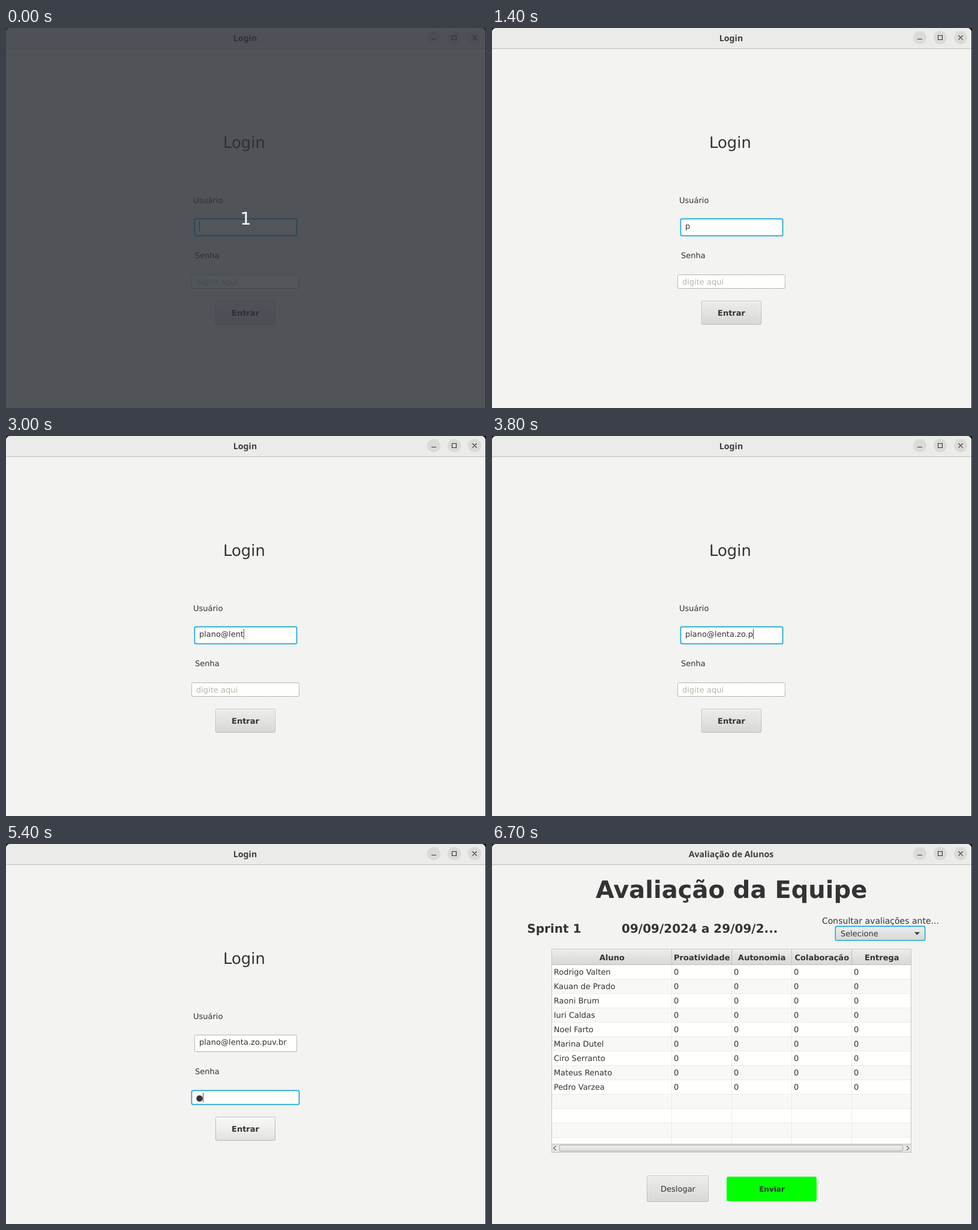
These frames come from a looping animation (800 by 634 pixels, 8000 ms). An HTML page:

```html
<!DOCTYPE html>
<html lang="pt-BR">
<head>
<meta charset="utf-8">
<title>Login</title>
<style>
html, body { margin: 0; width: 100%; height: 100%; overflow: hidden; background: #151515; }
svg { display: block; width: 800px; height: 634px; }
text { font-family: "DejaVu Sans", sans-serif; font-size: 13px; fill: #333; text-rendering: geometricPrecision; white-space: pre; }
.bold { font-weight: bold; }
.mid { text-anchor: middle; }
.title { font: bold 14.2px "Noto Sans", "Open Sans", sans-serif; fill: #3d3d3d; }
</style>
</head>
<body>
<svg id="stage" viewBox="0 0 800 634" xmlns="http://www.w3.org/2000/svg"></svg>
<script>
const LOOP = 8000;
const EMAIL = "plano@lenta.zo.puv.br";
const NAMES = ["Rodrigo Valten", "Kauan de Prado", "Raoni Brum", "Iuri Caldas", "Noel Farto",
  "Marina Dutel", "Ciro Serranto", "Mateus Renato", "Pedro Varzea"];
const BLUE = "#039ed3";

// [time, characters typed]
const TYPING = [[0, 0], [900, 1], [1600, 2], [1800, 3], [1900, 4], [2000, 5], [2300, 6], [2600, 7],
  [2800, 8], [2900, 9], [3000, 10], [3200, 11], [3300, 12], [3400, 13], [3500, 14], [3700, 15],
  [3800, 16], [4000, 17], [4100, 18], [4300, 19], [4400, 21]];
// [time, caret visible]
const BLINK = [[0, 1], [300, 0], [600, 1], [1400, 0], [1600, 1], [5500, 0]];
const T = { reveal: 100, password: 4700, dot: 5000, hover: 5200, press: 5900, title: 6300, team: 6400, combo: 6700 };

const stage = document.getElementById("stage");

function el(parent, tag, attrs = {}, content) {
  const node = document.createElementNS("http://www.w3.org/2000/svg", tag);
  for (const key in attrs) node.setAttribute(key, attrs[key]);
  if (content !== undefined) node.textContent = content;
  return parent.appendChild(node);
}
const group = parent => el(parent, "g");
const rect = (p, x, y, width, height, fill, rx = 0) => el(p, "rect", { x, y, width, height, fill, rx });
const path = (p, d, stroke, width = 1) => el(p, "path", { d, stroke, "stroke-width": width, fill: "none" });
const label = (p, x, y, str, cls = "", size = 13) =>
  el(p, "text", { x, y, class: cls, style: cls === "title mid" ? "" : `font-size:${size}px` }, str);
const show = (node, on) => node.setAttribute("visibility", on ? "inherit" : "hidden");
const at = (steps, t) => steps.filter(s => s[0] <= t).pop()[1];

const defs = el(stage, "defs");
function gradient(id, ...colors) {
  const g = el(defs, "linearGradient", { id, x1: 0, y1: 0, x2: 0, y2: 1 });
  colors.forEach((c, i) => el(g, "stop", { offset: i / (colors.length - 1), "stop-color": c }));
  return `url(#${id})`;
}
const FACE = gradient("face", "#ececeb", "#d8d8d7");
const HOVER = gradient("hover", "#f8f8f6", "#e3e3e1");
const DOWN = gradient("down", "#dbdbda", "#cacac9");
const RIM = gradient("rim", "#fafaf9", "#e2e2e1");
const BORDER = gradient("border", "#c2c2c1", "#b2b2b1");
const TRACK = gradient("track", "#d9d9d8", "#ececeb", "#e2e2e1");

function focusRing(p, x, y, w, h) {
  const g = group(p);
  rect(g, x - 1.4, y - 1.4, w + 2.8, h + 2.8, "#cfe8ef", 4);
  rect(g, x - .2, y - .2, w + .4, h + .4, BLUE, 3);
  return g;
}

function field(p, x, y, w, h) {
  const plain = group(p);
  rect(plain, x, y, w, h, BORDER, 3);
  rect(plain, x + 1, y + 1, w - 2, h - 2, "#fffffd", 2);
  rect(plain, x + 1, y + 1, w - 2, 1, "#e9e9e8", 1);
  const focus = focusRing(p, x, y, w, h);
  rect(focus, x + 1, y + 1, w - 2, h - 2, "#d9eff6", 2);
  rect(focus, x + 2.4, y + 2.4, w - 4.8, h - 4.8, "#fffffd", 1);
  return on => { show(plain, !on); show(focus, on); };
}

function button(p, x, y, w, h) {
  const border = rect(p, x, y, w, h, BORDER, 3);
  const ring = focusRing(p, x, y, w, h);
  const rim = rect(p, x + 1, y + 1, w - 2, h - 2, RIM, 2);
  const face = rect(p, x + 2, y + 2, w - 4, h - 4, FACE, 1);
  return (fill, focused) => {
    face.setAttribute("fill", fill);
    rim.setAttribute("fill", focused ? "#d3e6ec" : RIM);
    show(border, !focused);
    show(ring, focused);
  };
}

// window frame
rect(stage, 0, 0, 800, 634, "#151515");
el(stage, "path", { d: "M0 634V8Q0 0 8 0H791Q799 0 799 8V634Z", fill: "#f3f3f1" });
el(stage, "path", { d: "M0 34V8Q0 0 8 0H791Q799 0 799 8V34Z", fill: "#ebebe9" });
rect(stage, 0, 34, 799, 1, "#bfbfbc");
const title = label(stage, 398.5, 22, "Login", "title mid");
for (const x of [713, 747, 781]) el(stage, "circle", { cx: x, cy: 16, r: 11, fill: "#dadad7" });
path(stage, "M709 18.5H717M743.5 12.5H750.5V19.5H743.5ZM777.5 12.5L784.5 19.5M784.5 12.5L777.5 19.5", "#333", 1.1);

// login form
const login = group(stage);
label(login, 397, 200, "Login", "mid", 26);
label(login, 312, 292, "Usuário");
const focusUser = field(login, 314, 318, 171, 29);
const user = label(login, 322, 335, "");
label(login, 315, 384, "Senha");
const focusPass = field(login, 309, 411, 180, 24);
const prompt = label(login, 317, 428, "digite aqui");
prompt.style.fill = "#b3b6a8";
const dot = el(login, "circle", { cx: 322.5, cy: 424.5, r: 5.2, fill: "#333" });
const caret = rect(login, 322, 322, 1, 17, "#4a4a4a");
const setEnter = button(login, 349, 455, 100, 40);
label(login, 399, 480, "Entrar", "bold mid");

// team evaluation
const team = group(stage);
label(team, 399, 90, "Avaliação da Equipe", "bold mid", 40);
label(team, 58.5, 148, "Sprint 1", "bold", 20);
label(team, 216, 148, "09/09/2024 a 29/09/2...", "bold", 20);
label(team, 550, 133, "Consultar avaliações ante...", "", 14);
const setCombo = button(team, 572, 137, 150, 24);
label(team, 581, 154, "Selecione");
el(team, "path", { d: "M704 147H713L708.5 152Z", fill: "#444" });

rect(team, 99, 175, 600, 340, "#c3c3c1");
rect(team, 100, 176, 598, 338, "#fffffd");
for (let i = 0; i < 13; i++) {
  const y = 202 + i * 24, h = Math.min(24, 500 - y);
  if (i % 2) rect(team, 100, y, 598, h, "#f8f8f7");
  if (h === 24) rect(team, 100, y + 23, 598, 1, "#ececeb");
}
rect(team, 100, 176, 598, 25, FACE);
rect(team, 100, 176, 598, 1, "#f4f4f3");
rect(team, 100, 201, 598, 1, "#c3c3c1");
for (const x of [299, 399, 499, 599]) {
  rect(team, x, 176, 1, 25, "#c0c0be");
  rect(team, x, 202, 1, 298, "#ebebe9");
}
["Aluno", "Proatividade", "Autonomia", "Colaboração", "Entrega"].forEach((head, i) =>
  label(team, i ? 249.8 + i * 100 : 200, 194, head, "bold mid"));
NAMES.forEach((name, i) => {
  const y = 218 + i * 24;
  label(team, 103, y, name);
  for (let x = 303; x < 700; x += 100) label(team, x, y, "0");
});
rect(team, 100, 500, 598, 14, TRACK);
rect(team, 100, 500, 598, 1, "#c8c8c6");
rect(team, 112, 502, 573, 11, "#adadac", 3);
rect(team, 113, 503, 571, 9, gradient("thumb", "#f0f0ef", "#dcdcdb"), 2);
path(team, "M106.5 504L102.5 507.5L106.5 511M691 504L695 507.5L691 511", "#555", 1.1);

button(team, 258, 553, 103, 44)(FACE, false);
label(team, 310, 580, "Deslogar", "mid");
rect(team, 391, 555, 150, 41, "#00ff00", 3);
label(team, 466.5, 580, "Enviar", "bold mid", 12);

// countdown
const countdown = group(stage);
rect(countdown, 0, 0, 800, 634, "rgb(45,49,57)").setAttribute("opacity", .82);
label(countdown, 399.5, 328, "1", "mid", 29).style.fill = "#fff";

function render(t) {
  const onPass = t >= T.password, pressed = t >= T.press, inTeam = t >= T.team;
  show(countdown, t < T.reveal);
  show(login, !inTeam);
  show(team, inTeam);
  title.textContent = t < T.title ? "Login" : "Avaliação de Alunos";

  const typed = EMAIL.slice(0, at(TYPING, t));
  if (user.textContent !== typed) user.textContent = typed;
  focusUser(!onPass);
  focusPass(onPass && !pressed);
  show(prompt, !onPass);
  show(dot, t >= T.dot);

  const x = onPass ? (t < T.dot ? 317 : 328) : 322 + (typed ? user.getComputedTextLength() : 0);
  caret.setAttribute("x", Math.round(x));
  caret.setAttribute("y", onPass ? 415 : 322);
  caret.setAttribute("height", onPass ? 16 : 17);
  show(caret, at(BLINK, t));

  setEnter(pressed ? DOWN : t >= T.hover ? HOVER : FACE, pressed);
  setCombo(t >= T.combo ? FACE : HOVER, true);
}

function tick() {
  render(performance.now() % LOOP);
  requestAnimationFrame(tick);
}
tick();
</script>
</body>
</html>
```
